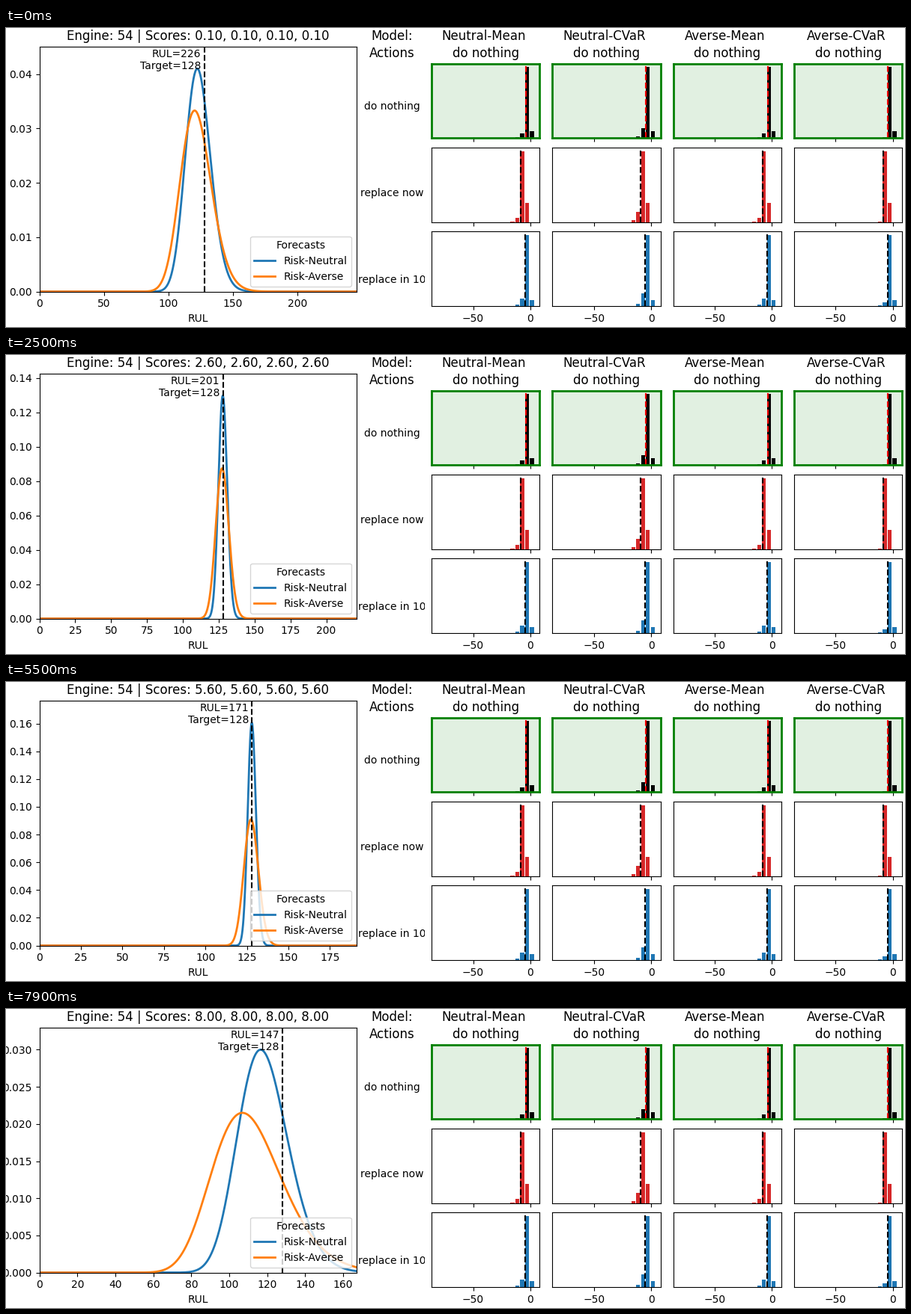
A matplotlib script for the animation above (8 s loop, 1200 px wide and 400 px high).

```python
import numpy as np
import matplotlib.pyplot as plt
from matplotlib.animation import FuncAnimation
from matplotlib.patches import Rectangle

W, H, DPI = 1200, 400, 100
FRAMES, INTERVAL = 80, 100
FIRST_RUL, TARGET = 226, 128

# Key points of the forecasts: the sharper the peak, the surer the forecast.
STEPS = [0, 16, 33, 46, 55, 64, 79]
NEUTRAL = [.0410, .1748, .0994, .0264, .1606, .1236, .0300]
AVERSE = [.0333, .1272, .0626, .0247, .0910, .0759, .0215]

# Model: name, weight of the left tail, shift of the mean line.
MODELS = [("Neutral-Mean", .065, 0), ("Neutral-CVaR", .14, -1.5),
          ("Averse-Mean", .065, .2), ("Averse-CVaR", .01, -.4)]
# Action: label, bar colour, line colour, tallest bin, height of the bar to
# its right, extra tail, mean line in pixels from zero.
ACTIONS = [("do nothing", "black", "red", -1, .095, 0, -5.9),
           ("replace now", "tab:red", "black", -2, .27, 0, -12.4),
           ("replace in 10", "tab:blue", "black", -1, .085, .045, -6.3)]
PX_PER_UNIT = 1.525
BIN = 6.5 / PX_PER_UNIT

fig = plt.figure(figsize=(W / DPI, H / DPI), dpi=DPI, facecolor="white")


def add_axes(x0, y0, x1, y1):
    """Axes from pixel edges, measured from the top left."""
    return fig.add_axes([x0 / W, 1 - y1 / H, (x1 - x0) / W, (y1 - y0) / H])


def label(x, y, text, size=12, va="baseline"):
    fig.text(x / W, 1 - y / H, text, size=size, ha="center", va=va, zorder=3)


def cover(x0, x1, zorder):
    fig.add_artist(Rectangle((x0 / W, 0), (x1 - x0) / W, 1, color="white",
                             lw=0, transform=fig.transFigure, zorder=zorder))


def draw_panel(row, col):
    _, color, line_color, top_bin, right, extra, mean = ACTIONS[row]
    name, tail, shift = MODELS[col]
    tail += extra
    x0, y0 = 568 + 161.3 * col, 47.6 + 112.4 * row
    ax = add_axes(x0, y0, x0 + 144.4, y0 + 99.8)
    centers = 2.3 / PX_PER_UNIT + BIN * (top_bin + np.arange(-2, 2))
    ax.bar(centers, [tail / 5, tail, 1, right], width=0.8 * BIN, color=color)
    ax.axvline((mean + shift) / PX_PER_UNIT, color=line_color, ls="--", lw=1.5)
    ax.set(xlim=(-86.4, 8.3), ylim=(0, 1.05), xticks=[-50, 0], yticks=[])
    ax.tick_params(labelbottom=row == 2)
    if row == 0:
        ax.set_facecolor("#e1f0e1")
        for spine in ax.spines.values():
            spine.set(color="green", linewidth=2)
        ax.set_title("do nothing")
        label(x0 + 69.4, 16.2, name)


def lognormal(x, mode, peak):
    """Log-normal density with the given mode and peak height."""
    base = 1 / (mode * peak * np.sqrt(2 * np.pi))
    s = base
    for _ in range(6):
        s = base * np.exp(-s * s / 2)
    z = (np.log(x / mode) - s * s) / s
    return np.exp(-z * z / 2) / (x * s * np.sqrt(2 * np.pi))


def peak_at(step, peaks):
    return np.exp(np.interp(step, STEPS, np.log(peaks)))


def forecast(x, peak, lag):
    """Wide forecasts fall short of the target, narrow ones settle on it."""
    return lognormal(x, TARGET + 0.2 - lag * (0.03 / peak) ** 2.3, peak)


for row in range(len(ACTIONS)):
    for col in range(len(MODELS)):
        draw_panel(row, col)

# The label column hides whatever runs over from its left neighbour.
cover(475.5, 559, 1)
cover(559, 566, 4)
label(515.3, 16.2, "Model:")
label(515.3, 39.3, "Actions")
for row, action in enumerate(ACTIONS):
    label(515.2, 104.7 + 116 * row, action[0], size=10, va="center")

main = add_axes(44.6, 24.6, 467.8, 352.6)
neutral, = main.plot([], [], color="tab:blue", lw=2, label="Risk-Neutral")
averse, = main.plot([], [], color="tab:orange", lw=2, label="Risk-Averse")
main.axvline(TARGET, color="black", ls="--", lw=1.5)
main.set_xlabel("RUL")
main.legend(title="Forecasts", loc="lower right")
title = main.set_title("")
note = main.annotate("", (TARGET, 1), xycoords=("data", "axes fraction"),
                     xytext=(-3.1, -2.6), textcoords="offset points",
                     ha="right", va="top")


def update(step):
    rul = FIRST_RUL - step
    x = np.linspace(0.01, rul + 20, 1200)
    peak = peak_at(step, NEUTRAL)
    neutral.set_data(x, forecast(x, peak, 11.7))
    averse.set_data(x, forecast(x, peak_at(step, AVERSE), 9.9))
    main.set_xlim(0, rul + 20)
    main.set_ylim(0, 1.1 * peak)
    score = f"{(step + 1) / 10:.2f}"
    title.set_text("Engine: 54 | Scores: " + ", ".join([score] * 4))
    note.set_text(f"RUL={rul}\nTarget={TARGET}")
    return neutral, averse, title, note


anim = FuncAnimation(fig, update, frames=FRAMES, interval=INTERVAL,
                     repeat=True, repeat_delay=0)
plt.show()
```
